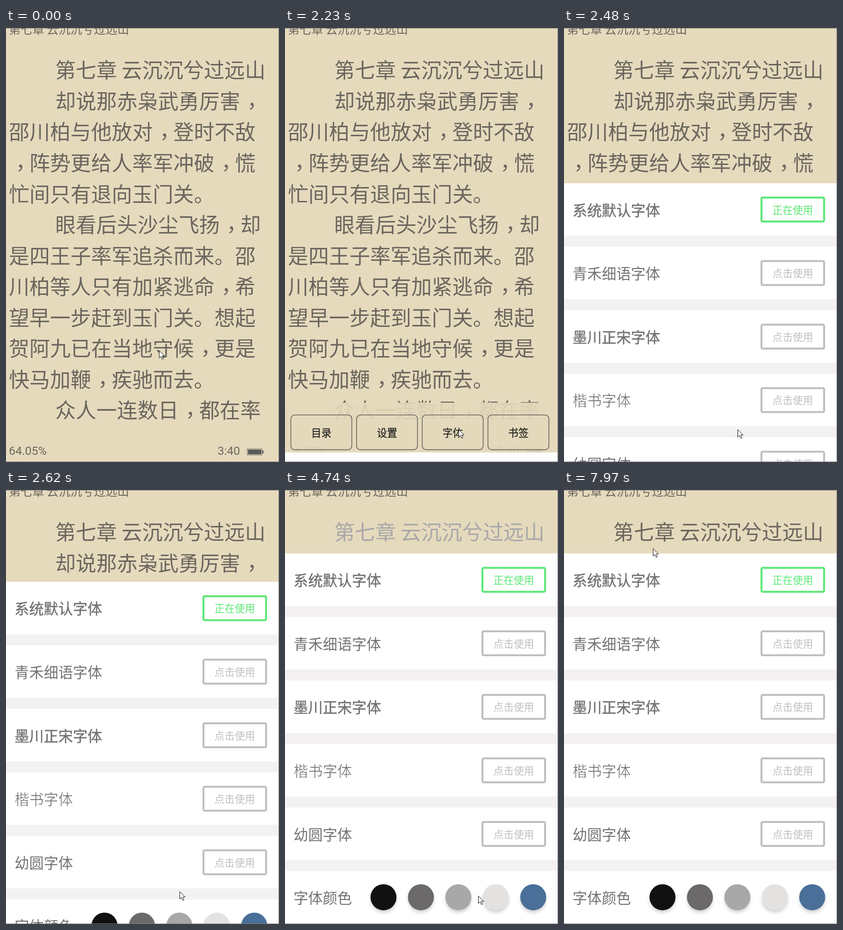
Recreate the animation shown at these times as an HTML page. Size 571 by 906 pixels, loop 8 s.

```html
<!DOCTYPE html>
<html lang="zh-CN">
<head>
<meta charset="utf-8">
<title>阅读器</title>
<style>
html, body { margin: 0; width: 100%; height: 100%; overflow: hidden; background: #e6dabd; }
svg { display: block; width: 571px; height: 906px; font-family: "Noto Sans CJK SC", "Noto Sans CJK", sans-serif; }
.latin { font-family: Roboto, "Noto Sans", sans-serif; font-size: 24.4px; }
.mid { text-anchor: middle; font-size: 21.2px; }
.label { font-size: 30.5px; fill: #737373; stroke-width: .5; }
.strong { stroke: #737373; }
.plain { stroke: none; }
.thin { stroke: #fff; }
</style>
</head>
<body>
<svg id="stage" viewBox="0 0 571 906"></svg>
<script>
const LOOP = 8000;
const GREY = '#6b665e';
const SWATCHES = ['#111111', '#6c696a', '#a8a8a8', '#e3e2e1', '#4a6f98'];
const TITLE = '第七章 云沉沉兮过远山';

// A leading ">" marks a paragraph indent.
const LINES = [
  '>' + TITLE, '>却说那赤枭武勇厉害，', '邵川柏与他放对，登时不敌', '，阵势更给人率军冲破，慌',
  '忙间只有退向玉门关。', '>眼看后头沙尘飞扬，却', '是四王子率军追杀而来。邵', '川柏等人只有加紧逃命，希',
  '望早一步赶到玉门关。想起', '贺阿九已在当地守候，更是', '快马加鞭，疾驰而去。', '>众人一连数日，都在率'
];
const FONTS = [
  ['系统默认字体', 'strong'], ['青禾细语字体', 'plain'], ['墨川正宋字体', 'strong'],
  ['楷书字体', 'thin'], ['幼圆字体', 'plain']
];
const MENU = ['目录', '设置', '字体', '书签'];
const ROW = 132.6, ROW_H = 109.6;

// Commas sit in the middle of their cell.
function centreCommas(s) {
  const parts = s.split('，');
  return parts.join('<tspan dx="14" dy="-3">，</tspan><tspan dx="-14" dy="3">') +
    '</tspan>'.repeat(parts.length - 1);
}

function bodyLine(s, i) {
  const x = s[0] === '>' ? 103 : 6;
  return `<text x="${x}" y="${104.3 + 64.55 * i}" font-size="43">${centreCommas(s.replace('>', ''))}</text>`;
}

function menuButton(name, i) {
  const x = 12.3 + 137.4 * i;
  return `<rect id="menu${i}" x="${x}" y="807.8" width="127.4" height="72.6" rx="8" fill="#000" fill-opacity="0"
    stroke="#6a665f" stroke-width="1.6"/>
    <text class="mid" x="${x + 63.7}" y="852.6" fill="#262522" stroke="#262522" stroke-width=".3">${name}</text>`;
}

function fontRow([name, style], i) {
  const y = ROW * i, c = i ? '#bfbfbf' : '#5de776';
  return `<rect y="${y}" width="571" height="${ROW_H}" fill="#fff"/>
    <text class="label ${style}" x="18" y="${y + 67.6}">${name}</text>
    <rect x="413" y="${y + 30}" width="131" height="50" rx="2.5" fill="none" stroke="${c}" stroke-width="4"/>
    <text class="mid" x="478.5" y="${y + 63.6}" fill="${c}">${i ? '点击使用' : '正在使用'}</text>`;
}

const swatch = (c, i) =>
  `<circle id="swatch${i}" cx="${206 + 78.3 * i}" cy="717.7" r="27.2" fill="${c}"/>`;

document.getElementById('stage').innerHTML = `
  <rect width="571" height="906" fill="#e6dabd"/>
  <g fill="${GREY}">
    <text x="6" y="11.5" font-size="24.6">${TITLE}</text>
    <g id="page">${LINES.map(bodyLine).join('')}</g>
    <text class="latin" x="6" y="891">64.05%</text>
    <text class="latin" x="442.5" y="891">3:40</text>
    <rect x="504.5" y="878.5" width="31" height="13" fill="none" stroke="#77726a"/>
    <rect x="506" y="880" width="28" height="10" fill="#595959"/>
    <rect x="536" y="882" width="2.6" height="6" fill="#595959"/>
  </g>
  <g id="menu">
    <rect y="782" width="571" height="124" fill="#e6dabd" fill-opacity=".9"/>
    ${MENU.map(menuButton).join('')}
  </g>
  <g id="panel">
    <rect width="571" height="906" fill="#f3f1f2"/>
    ${FONTS.map(fontRow).join('')}
    <rect y="${ROW * 5}" width="571" height="${ROW_H + 10}" fill="#fff"/>
    <text class="label plain" x="18" y="${ROW * 5 + 67.4}">字体颜色</text>
    ${SWATCHES.map(swatch).join('')}
  </g>
  <path id="cursor" d="M.5 .5V16l3.6-3.4 2.6 5.9 2.6-1.1-2.6-5.7h5z" fill="#fff" stroke="#111" stroke-width="1"/>
  <path d="M0 .5H570.5V905.5H0" fill="none" stroke="#828080"/>`;

const el = id => document.getElementById(id);

// Bursts of change: start, end, number of steps.
const BURSTS = [
  [0, 0, 1], [840, 840, 1], [1120, 2090, 8], [2230, 2740, 5], [3140, 3270, 2], [3570, 4440, 7],
  [4740, 5680, 7], [5800, 5800, 1], [6080, 6510, 4], [7040, 7970, 7]
];
function snap(t) {
  const [start, end, n] = BURSTS.filter(b => b[0] <= t).pop();
  if (n === 1) return start;
  const step = (end - start) / (n - 1);
  return start + step * Math.min(n - 1, Math.floor((t - start + 12) / step));
}

// Linear track through [time, ...values] keys.
function track(keys, t) {
  const i = keys.findIndex(k => k[0] > t);
  if (i === 0) return keys[0].slice(1);
  if (i < 0) return keys[keys.length - 1].slice(1);
  const a = keys[i - 1], b = keys[i], u = (t - a[0]) / (b[0] - a[0]);
  return a.slice(1).map((v, j) => v + (b[j + 1] - v) * u);
}

const CURSOR = [
  [1000, 320, 673], [1800, 363, 838], [3020, 363, 838], [3140, 357, 838], [3270, 353, 839],
  [4440, 353, 839], [4740, 404, 847], [4890, 432, 853], [5350, 432, 853], [5660, 525, 858],
  [5960, 525, 858], [6510, 299, 851], [7400, 299, 851], [7970, 186, 122]
];
const PANEL = [[2229, 906], [2230, 886], [2357, 625], [2485, 324], [2612, 192], [2740, 132.5]];
const COLOURS = [[0, GREY], [3840, SWATCHES[2]], [5200, SWATCHES[3]], [5800, SWATCHES[4]], [7180, GREY]];
const PRESSES = [[2, 3700, 4200], [3, 5030, 5400], [4, 5670, 6000], [1, 7180, 7500]];

function draw(time) {
  const t = snap(time);
  const [x, y] = track(CURSOR, t);
  el('cursor').setAttribute('transform', `translate(${Math.round(x)} ${Math.round(y)})`);
  el('menu').style.display = t >= 840 ? '' : 'none';
  el('menu2').setAttribute('fill-opacity', t > 1900 && t < 2080 ? .06 : 0);
  el('panel').style.display = t >= 2230 ? '' : 'none';
  el('panel').setAttribute('transform', `translate(0 ${track(PANEL, t)[0]})`);
  el('page').setAttribute('fill', COLOURS.filter(c => c[0] <= t).pop()[1]);
  SWATCHES.forEach((c, i) => {
    const down = PRESSES.some(p => p[0] === i && t >= p[1] && t < p[2]);
    el('swatch' + i).style.filter = down
      ? 'drop-shadow(0 6px 5px rgba(0,0,0,.3))'
      : 'drop-shadow(0 5px 3px rgba(0,0,0,.17))';
  });
}

const begin = performance.now();
function tick() {
  draw((performance.now() - begin) % LOOP);
  requestAnimationFrame(tick);
}
tick();
</script>
</body>
</html>
```
